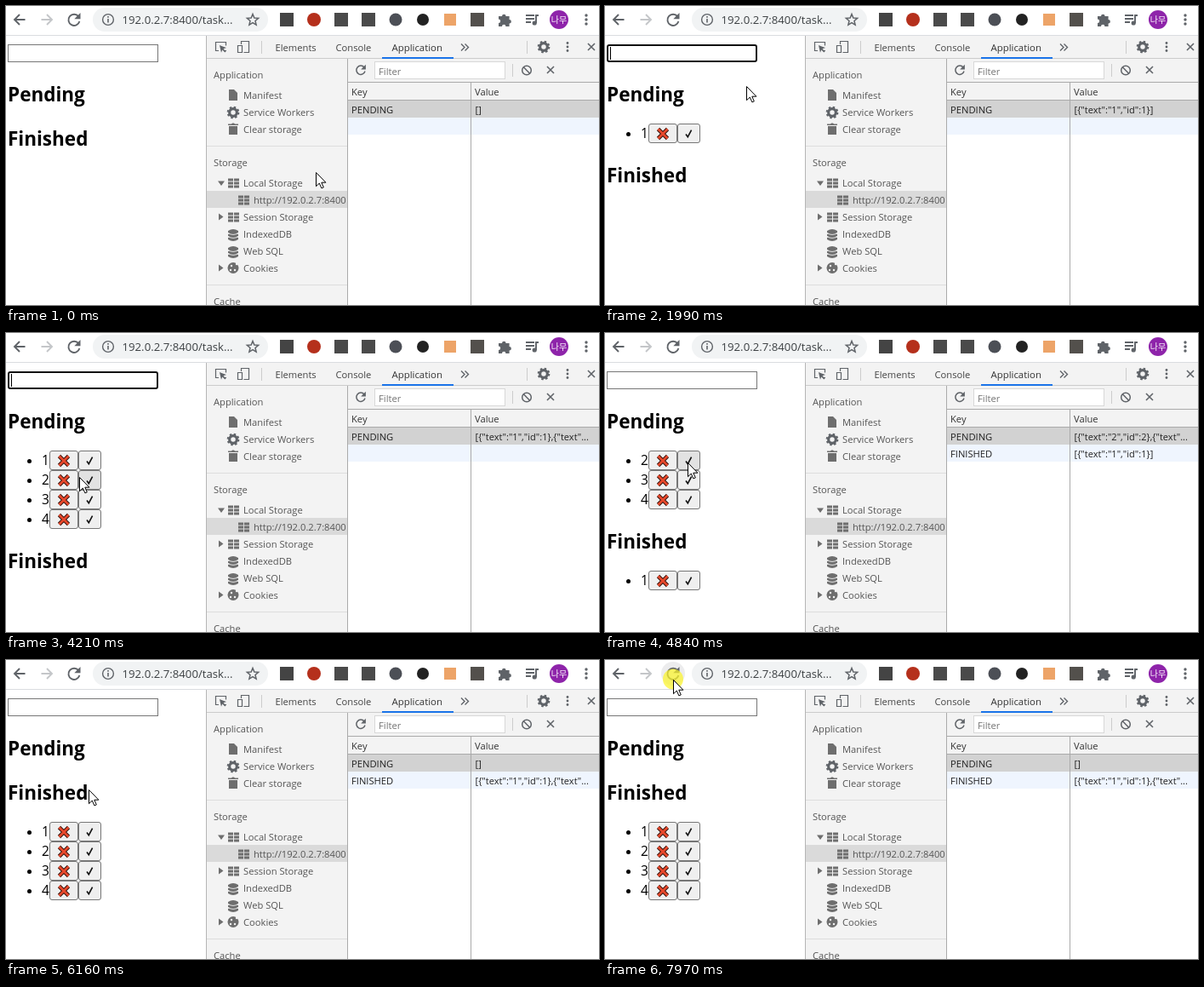
An HTML page for the animation above (8000 ms loop, 697 by 351 pixels).

```html
<!DOCTYPE html>
<html lang="en">
<head>
<meta charset="utf-8">
<title>To-do list with storage panel</title>
<style>
  html, body { margin: 0; width: 100%; height: 100%; overflow: hidden; background: #fff; }
  svg { display: block; width: 100vw; height: 100vh; }
  text { font-family: "Open Sans", "Noto Sans", "Noto Sans CJK KR", sans-serif; white-space: pre; }
</style>
</head>
<body>
<svg id="stage" viewBox="0 0 697 351"><g id="page"></g><g id="browser"></g><g id="live"></g></svg>
<script>
const LOOP = 8000;
const INK = '#5f6368', DARK = '#444', PANEL = '#f3f3f3', LINE = '#ccc';

// Drawing helpers
const rect = (x, y, w, h, fill, more = '') =>
  `<rect x="${x}" y="${y}" width="${w}" height="${h}" fill="${fill}" ${more}/>`;
const disc = (x, y, r, fill, more = '') => `<circle cx="${x}" cy="${y}" r="${r}" fill="${fill}" ${more}/>`;
const ring = (x, y, r, color, width = 1.5, more = '') =>
  disc(x, y, r, 'none', `stroke="${color}" stroke-width="${width}" ${more}`);
const stroke = (d, color = INK, width = 1.5, more = '') =>
  `<path d="${d}" fill="none" stroke="${color}" stroke-width="${width}" ${more}/>`;
const shape = (d, fill = INK, more = '') => `<path d="${d}" fill="${fill}" ${more}/>`;
const text = (x, y, s, size = 11.2, fill = DARK, more = '') =>
  `<text x="${x}" y="${y}" font-size="${size}" fill="${fill}" ${more}>${s}</text>`;
const at = (x, y, content, scale = 1) => `<g transform="translate(${x} ${y}) scale(${scale})">${content}</g>`;
const cross = (x, y, r, width = 1.6) =>
  stroke(`M${x - r} ${y - r}l${2 * r} ${2 * r}m0 ${-2 * r}l${-2 * r} ${2 * r}`, INK, width);
const dots = (x, y, gap, r) => [-1, 0, 1].map(i => disc(x, y + i * gap, r, INK)).join('');
const gear = (x, y, r) => ring(x, y, r * .62, INK, r * .45) +
  ring(x, y, r * .9, INK, r * .3, `stroke-dasharray="${r * .353} ${r * .353}"`);
const reload = (x, y, scale) => at(x, y,
  stroke('M5.2 -3.8A6.6 6.6 0 1 0 6.4 2', INK, 1.9) + shape('M7.5 -8v7.2h-7.2z'), scale);

const star = (x, y, r) => {
  const points = Array.from({ length: 10 }, (_, i) => {
    const a = Math.PI * (i / 5 - .5), d = i % 2 ? r * .45 : r;
    return `${x + d * Math.cos(a)},${y + d * Math.sin(a)}`;
  });
  return `<polygon points="${points.join(' ')}" fill="none" stroke="${INK}" stroke-width="1.5"/>`;
};

const grid = (x, y) => [0, 1, 2].map(i =>
  rect(x, y + i * 4, 6, 3, '#6e6e6e') + rect(x + 7, y + i * 4, 6, 3, '#6e6e6e')).join('');
const database = (x, y) => [0, 1, 2].map(i =>
  shape(`M${x} ${y + 2 + i * 4}q6 -4 12 0v2q-6 4 -12 0z`, '#6e6e6e')).join('') +
  [1, 2].map(i => stroke(`M${x} ${y + .6 + i * 4}q6 3.6 12 0`, PANEL, .9)).join('');
const triangle = (x, y, open) => shape(open ? `M${x - 4} ${y - 2.5}h8l-4 5.5z` : `M${x - 2} ${y - 4}v8l5.5 -4z`, '#6e6e6e');

function toolbar() {
  const arrow = (x, flip, color) => at(x, 16,
    stroke(`M${6.5 * flip} 0H${-5.5 * flip}M0 -6L${-6 * flip} 0L0 6`, color, 1.9));
  const puzzle = shape('M-7 -4h4a2.3 2.3 0 1 1 4.6 0h4v4a2.3 2.3 0 1 1 0 4.6v3.4h-4.2a2.2 2.2 0 0 0-4.4 0h-4v-4a2.2 2.2 0 0 0 0-4.4z');
  const queue = stroke('M-7 -5H3M-7 -1H3M-7 3H-1M5 4V-5H8', INK, 1.9) + disc(3.2, 4, 2.6, INK);
  return rect(0, 0, 697, 34, '#fff') + rect(0, 34, 697, 1, '#dadce0') +
    arrow(16, 1, INK) + arrow(48, -1, '#c4c6c9') +
    rect(102, 2, 206, 28, '#f1f3f4', 'rx="14"') +
    ring(120, 16, 6.4, INK, 1.4) + rect(119.2, 15, 1.6, 4.5, INK) + rect(119.2, 12, 1.6, 1.7, INK) +
    text(136.5, 21, '192.0.2.7:8400/task...', 13.2, '#3c4043') + star(290, 16.5, 7) +
    rect(322, 8, 16, 16, '#444') + disc(362, 16, 8, '#b5301c') +
    rect(386, 8, 16, 16, '#4a4a4a') + rect(418, 8, 16, 16, '#4a4a4a') +
    disc(458, 16, 7.5, '#4c4f56') + disc(490, 16, 7, '#222') +
    rect(515, 9, 14, 14, '#eda468') + rect(546, 8, 16, 16, '#53504c') +
    at(586, 16, puzzle) + at(618, 16, queue) +
    disc(650, 16, 11, '#8e24aa') + text(650, 20, '나무', 10, '#fff', 'text-anchor="middle"') +
    dots(682, 16, 5, 1.7);
}

function tabs() {
  return rect(236, 35, 461, 26, PANEL) + rect(236, 61, 461, 1, LINE) +
    stroke('M256 52.5h3M250 52.5h-3.5v-10h12v4', INK, 1.2) + shape('M251 46l8 3-3.5 1.2 3 3-1.2 1.2-3-3-1.3 3.3z') +
    stroke('M276.5 45v-3.5h9v13h-6', INK, 1.2) + stroke('M272.5 46.5h5v8h-5z', INK, 1.2) +
    rect(300, 41, 1, 15, LINE) +
    text(316.5, 52.5, 'Elements') + text(387.5, 52.5, 'Console') + text(453.5, 52.5, 'Application', 11.4, '#333') +
    rect(442, 60, 84, 2, '#1a73e8') +
    stroke('M535 44.5l4 4-4 4M539.5 44.5l4 4-4 4', INK, 1.4) +
    rect(612, 41, 1, 15, LINE) + gear(632, 48, 7) + dots(660, 48, 4.5, 1.4) + cross(688, 48, 4);
}

function sidebar() {
  const gray = '#6e6e6e';
  const label = (x, y, s) => text(x, y + 4.3, s, 11.2, '#555');
  return rect(236, 62, 165, 289, PANEL) + rect(235, 35, 1, 316, '#b5b5b5') +
    label(244, 81, 'Application') +
    shape('M262 98h6l4 4v9h-10z', gray) + label(279, 104.5, 'Manifest') +
    gear(267, 125, 7) + label(279, 124.5, 'Service Workers') +
    shape('M262 141h10v10h-10zM261 138.5h4l1-1h2l1 1h4v1.5h-12z', gray) + label(279, 144.5, 'Clear storage') +
    rect(236, 164, 165, 1, '#ddd') + label(244, 184, 'Storage') +
    triangle(253, 208, true) + grid(261, 202.5) + label(279, 208, 'Local Storage') +
    rect(236, 217, 165, 20, '#dadada') + grid(273, 222.5) + label(291, 228, 'http://192.0.2.7:8400') +
    triangle(252, 247.5) + grid(261, 242.5) + label(279, 248, 'Session Storage') +
    database(261, 262) + label(279, 268, 'IndexedDB') +
    database(261, 282) + label(279, 288, 'Web SQL') +
    triangle(252, 307.5) + disc(267, 307.5, 6.5, gray) +
    [[265, 305], [269, 310], [264, 310], [271, 303]].map(([x, y]) => disc(x, y, 1.2, PANEL)).join('') +
    label(279, 308, 'Cookies') +
    rect(236, 327, 165, 1, '#ddd') + label(244, 347, 'Cache');
}

function table() {
  return rect(401, 62, 296, 289, '#fff') + rect(401, 62, 296, 49, PANEL) +
    reload(417, 75, .78) +
    rect(433.5, 65.5, 153, 20, '#fff', 'stroke="#d8d8d8"') + text(438, 80.5, 'Filter', 11.25, '#757575') +
    rect(595, 68, 1, 15, LINE) + ring(612, 75.5, 5.3, INK, 1.5) + stroke('M608.3 71.8l7.4 7.4') + cross(640, 75, 4) +
    rect(401, 89, 296, 1, '#aaa') + text(406, 104.5, 'Key', 11.2, '#333') + text(551, 104.5, 'Value', 11.2, '#333') +
    rect(401, 110, 296, 1, '#aaa') +
    rect(401, 111, 296, 20, '#d2d2d2') + rect(401, 131, 296, 20, '#eff5fe') +
    rect(401, 62, 1, 289, '#aaa') + rect(546, 90, 1, 261, '#aaa');
}

// [start, pending ids, finished ids, typed text]
const states = [
  [0, '', '', ''], [1670, '', '', '1'], [1910, '1', '', ''], [2240, '1', '', '2'],
  [2400, '12', '', ''], [2790, '12', '', '3'], [3180, '123', '', ''], [3490, '123', '', '4'],
  [3730, '1234', '', ''], [4840, '234', '1', ''], [5230, '34', '12', ''],
  [5620, '4', '123', ''], [6160, '', '1234', '']
];
// [time, x, y] of the pointer tip
const path = [
  [0, 365, 195], [60, 365, 195], [480, 152, 54], [700, 152, 54], [1360, 165, 88], [1510, 167, 94],
  [2000, 167, 94], [2240, 154, 105], [2870, 152, 106], [3020, 153, 107], [3970, 153, 107],
  [4200, 87, 169], [4300, 87, 169], [4650, 98, 152], [6500, 98, 152], [6800, 77, 28],
  [6950, 77, 28], [7270, 81, 23], [LOOP, 81, 23]
];
const clicks = [[490, 570], [4690, 4840], [5070, 5230], [5540, 5620], [5920, 6160], [7890, LOOP]];
const caretOff = [[1040, 1670], [4290, 4690]];
const inside = (spans, t) => spans.some(([from, to]) => t >= from && t < to);

function pointer(t) {
  const i = path.findIndex(p => p[0] > t);
  const [t0, x0, y0] = path[i - 1], [t1, x1, y1] = path[i];
  const k = (t - t0) / (t1 - t0);
  return [Math.round(x0 + (x1 - x0) * k), Math.round(y0 + (y1 - y0) * k)];
}

function button(x, y, w, [px, py], pressed) {
  const hover = px >= x && px < x + w && py >= y && py < y + 23;
  const fill = hover ? (pressed ? '#f5f5f5' : '#e2e2e2') : '#efefef';
  return rect(x + .5, y + .5, w - 1, 22, fill, 'rx="2.5" stroke="#767676"');
}

function list(ids, top, tip, pressed) {
  return [...ids].map((id, i) => {
    const y = top + i * 23;
    const x = `M62.5 ${y + 6.5}l11 11m0 -11l-11 11`;
    return disc(27.5, y + 12.5, 2.5, '#000') + text(42, y + 17, id, 15.6, '#000') +
      button(51, y, 34, tip, pressed) + button(85, y, 27, tip, pressed) +
      stroke(x, '#3a1710', 4.6) + stroke(x, '#e8482b', 2.7) +
      stroke(`M95 ${y + 12.5}l2.3 3.2l4.3 -8`, '#111', 1.6);
  }).join('');
}

const heading = (y, s) => text(2, y, s, 22.5, '#000', 'font-weight="700"');

function input(t, typed) {
  const focused = t >= 490 && t < 4690;
  const frame = focused
    ? rect(3, 46, 175, 19, '#fff', 'rx="2" stroke="#101010" stroke-width="2"')
    : rect(2.5, 45.5, 176, 20, '#fff', 'stroke="#767676"');
  const caretX = typed ? 13 : 6;
  return frame +
    `<text x="5.5" y="60" font-size="13.3" style="font-family:'Liberation Sans',sans-serif">${typed}</text>` +
    (focused && !inside(caretOff, t) ? rect(caretX, 48, 1, 15, '#000') : '');
}

function stored(ids) {
  if (!ids) return '[]';
  const first = `[{"text":"${ids[0]}","id":${ids[0]}}`;
  return first + (ids.length > 1 ? ',{"text"...' : ']');
}

const row = (y, key, ids) => text(406, y, key, 11.2, '#222') + text(551.5, y, stored(ids), 11.05, '#222');

const [page, browser, live] = ['page', 'browser', 'live'].map(id => document.getElementById(id));
browser.innerHTML = toolbar() + tabs() + sidebar() + table();

function draw(t) {
  const [, pending, finished, typed] = states.filter(s => s[0] <= t).pop();
  const tip = pointer(t), [x, y] = tip, pressed = inside(clicks, t);
  const shift = pending ? 20 + 23 * pending.length : 0;

  page.innerHTML = rect(0, 35, 235, 316, '#fff') + input(t, typed) +
    heading(112, 'Pending') + list(pending, 138, tip, pressed) +
    heading(164 + shift, 'Finished') + list(finished, 190 + shift, tip, pressed);

  live.innerHTML = (y < 25 ? disc(80, 16, 14, '#ececed') : '') + reload(80, 16, 1) +
    row(125.5, 'PENDING', pending) + (finished ? row(145.5, 'FINISHED', finished) : '') +
    (pressed ? disc(x - 1, y - .5, 12, '#fbf42a', 'opacity=".72"') : '') +
    at(x - .5, y + .5, shape('M0 0V16.2L3.8 12.6L6.4 18.4L8.8 17.4L6.3 11.7H11.4Z', '#fff', 'stroke="#000"'));
}

function tick(now) {
  draw(now % LOOP);
  requestAnimationFrame(tick);
}
draw(0);
requestAnimationFrame(tick);
</script>
</body>
</html>
```
